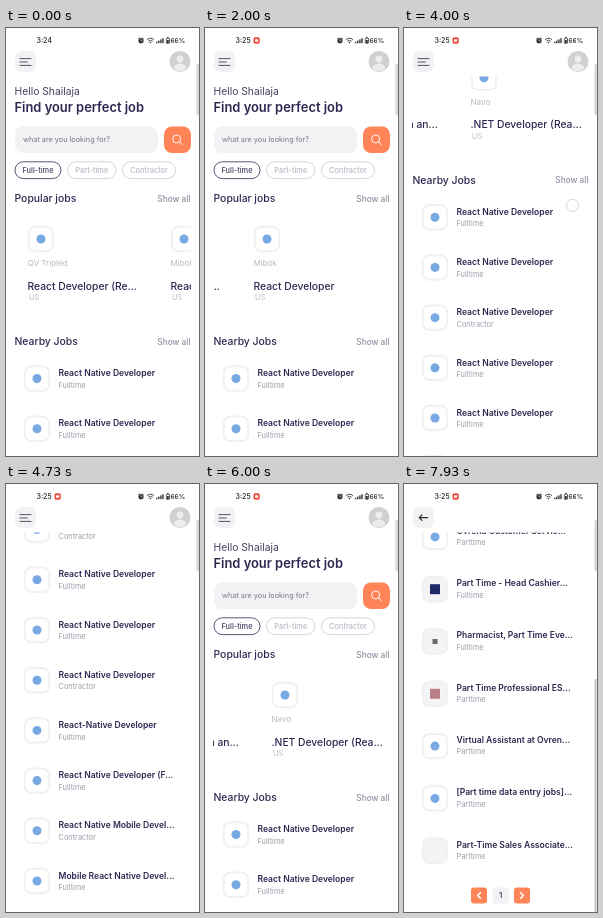
Recreate the animation shown at these times as an HTML page. Size 193 px wide and 428 px high, loop 8 s.

```html
<!DOCTYPE html>
<html lang="en">
<head>
<meta charset="utf-8">
<title>Job finder app</title>
<style>
  html, body { margin: 0; height: 100%; overflow: hidden; background: #fff; }
  svg { display: block; width: 100vw; height: 100vh; font-family: Inter, "Open Sans", sans-serif; }
</style>
</head>
<body>
<svg id="stage" viewBox="0 0 193 428">
  <clipPath id="body"><rect y="48.5" width="193" height="380"/></clipPath>
  <clipPath id="strip"><rect x="8" y="180" width="177" height="110"/></clipPath>
</svg>
<script>
const LOOP = 8000, ROW = 50.2, JOB_ROW = 52.3, CARD = 143, PAGE_END = 240;
const INK = '#312651', NAVY = '#444262', MUTED = '#9f9eac', PALE = '#bbb9c6',
      ORANGE = '#ff8558', PANEL = '#f2f2f5', BLUE = '#78a9e2';

const stage = document.getElementById('stage');

function el(parent, tag, attrs = {}) {
  const node = document.createElementNS('http://www.w3.org/2000/svg', tag);
  set(node, attrs);
  return parent.appendChild(node);
}
function set(node, attrs) {
  for (const key in attrs) node.setAttribute(key, attrs[key]);
}
const group = (parent, attrs) => el(parent, 'g', attrs);
const box = (parent, x, y, width, height, rx, fill, more) =>
  el(parent, 'rect', { x, y, width, height, rx, fill, ...more });
const disc = (parent, cx, cy, r, fill, more) => el(parent, 'circle', { cx, cy, r, fill, ...more });
const line = (parent, d, stroke, width = 1) =>
  el(parent, 'path', { d, fill: 'none', stroke, 'stroke-width': width, 'stroke-linecap': 'round', 'stroke-linejoin': 'round' });
function text(parent, x, y, str, size, weight = 400, fill = INK, more) {
  const node = el(parent, 'text', { x, y, 'font-size': size, 'font-weight': weight, fill, ...more });
  node.textContent = str;
  return node;
}
const move = (node, x, y) => node.setAttribute('transform', `translate(${x} ${y})`);
const show = (node, on) => node.setAttribute('visibility', on ? 'inherit' : 'hidden');

function frame(parent, cx, cy, fill = '#fff') {
  box(parent, cx - 12.2, cy - 12.2, 24.4, 24.4, 6.5, fill, { stroke: '#f1f1f4', 'stroke-width': 2 });
}
function jobRow(parent, y, title, kind) {
  text(parent, 52.5, y + 3.2, title, 8.55, 600);
  text(parent, 52.5, y + 14.7, kind, 7.4, 400, MUTED);
}

// Home screen
const homeView = group(stage, { 'clip-path': 'url(#body)' });
const home = group(homeView);
text(home, 8.5, 67.3, 'Hello Shailaja', 10.3, 400, NAVY);
text(home, 8.5, 84, 'Find your perfect job', 12.9, 600);
box(home, 9, 98.5, 143, 26.5, 8, PANEL);
text(home, 17, 114.3, 'what are you looking for?', 7.3, 400, '#77768a');
box(home, 158, 98.5, 27, 26.5, 8, ORANGE);
disc(home, 170.7, 111, 4, 'none', { stroke: '#fff', 'stroke-width': 0.9 });
line(home, 'M173.7 114l2.8 2.8', '#fff', 0.9);

const chips = [['Full-time', 9, 46], ['Part-time', 61.5, 48.5], ['Contractor', 116.5, 53]].map(([name, x, w]) => ({
  edge: box(home, x, 133.8, w, 16.8, 8.4, '#fff', { 'stroke-width': 0.9 }),
  label: text(home, x + w / 2, 144.9, name, 7.4, 500, PALE, { 'text-anchor': 'middle' })
}));

function heading(y, title) {
  text(home, 8.5, y, title, 10.4, 500);
  text(home, 184.5, y - 0.2, 'Show all', 8.3, 500, '#918fa0', { 'text-anchor': 'end' });
}
heading(174, 'Popular jobs');
heading(316.9, 'Nearby Jobs');

const strip = group(group(home, { 'clip-path': 'url(#strip)' }));
[
  ['QV Tripled', 'React Developer (Re...'],
  ['Mibok', 'React Developer'],
  ['Navo', 'React Developer (Re...'],
  ['Tilmar', 'Node React develop...'],
  ['Navo', 'Patient Education an...'],
  ['Navo', '.NET Developer (Rea...']
].forEach(([firm, title], i) => {
  const x = 22 + i * CARD, green = i === 3;
  frame(strip, x + 13, 211, green ? PANEL : '#fff');
  disc(strip, x + 13, 211, 4.5, green ? '#2c5a3c' : BLUE);
  text(strip, x - 0.5, 238, firm, 8.1, 400, PALE);
  text(strip, x - 0.5, 261.6, title, 10.3, 500);
  text(strip, x + 1, 272, 'US', 7.3, 400, PALE);
});

[
  ['React Native Developer', 0], ['React Native Developer', 0], ['React Native Developer', 1],
  ['React Native Developer', 0], ['React Native Developer', 0], ['React Native Developer', 1],
  ['React-Native Developer', 0], ['React Native Developer (F...', 0],
  ['React Native Mobile Devel...', 1], ['Mobile React Native Devel...', 0]
].forEach(([title, contract], i) => {
  const y = 345 + i * ROW;
  frame(home, 31, y + 5.5);
  disc(home, 31, y + 5.5, 4.5, BLUE);
  jobRow(home, y, title, contract ? 'Contractor' : 'Fulltime');
});

const homeBar = group(stage);
box(homeBar, 9, 23, 21, 21, 6, PANEL);
line(homeBar, 'M14 30.6h11M14 34h7.5M14 37.4h11', '#45434f', 0.9);
disc(homeBar, 174, 33.5, 10.5, '#d0d0d2');
disc(homeBar, 174, 31, 3.4, '#ededee');
el(homeBar, 'path', { d: 'M167.6 40.8a6.4 5.4 0 0 1 12.8 0a10 10 0 0 1-12.8 0z', fill: '#ededee' });

// Part-time results page
const page = group(stage);
box(page, 0, 0, 193, 428, 0, '#fff');
const results = group(group(page, { 'clip-path': 'url(#body)' }));
text(results, 8.5, 74, 'Part-time', 12.9, 600);
text(results, 8.5, 92, 'Job Opportunities', 8.2, 400, MUTED);
const list = group(results);
const logos = [
  ['Part Time Store Associate...', 'Parttime', BLUE],
  ['Part Time Front Desk Cler...', 'Parttime', BLUE],
  ['Part-Time Office Assistant', 'Parttime', BLUE],
  ['Ovrena Customer Servic...', 'Parttime', BLUE],
  ['Part Time - Head Cashier...', 'Fulltime', '#1d2b66'],
  ['Pharmacist, Part Time Eve...', 'Fulltime', '#6d6a68'],
  ['Part Time Professional ES...', 'Parttime', '#b98186'],
  ['Virtual Assistant at Ovren...', 'Parttime', BLUE],
  ['[Part time data entry jobs]...', 'Parttime', BLUE],
  ['Part-Time Sales Associate...', 'Parttime', null]
].map(([title, kind, color], i) => {
  const y = 129.6 + i * JOB_ROW, cy = y + 6.4, round = color === BLUE;
  frame(list, 31, cy, round ? '#fff' : '#f4f4f7');
  jobRow(list, y, title, kind);
  if (!color) return null;
  const half = i === 5 ? 2.5 : 5;
  return round ? disc(list, 31, cy, 4.5, color)
               : box(list, 31 - half, cy - half, 2 * half, 2 * half, 0, color);
});
const footY = 411.5 + PAGE_END;
[67, 110].forEach((x, i) => {
  box(list, x, footY - 8, 16, 16, 3, ORANGE);
  const s = i ? 1 : -1;
  line(list, `M${x + 8 - s * 1.4} ${footY - 2.8}l${s * 2.8} 2.8l${-s * 2.8} 2.8`, '#fff', 1.6);
});
box(list, 88.5, footY - 8, 16.5, 16, 2, PANEL);
text(list, 96.7, footY + 2.9, '1', 8, 500, INK, { 'text-anchor': 'middle' });
const spinner = el(results, 'path', {
  d: 'M96.5 113a9 9 0 1 1-9 9', fill: 'none', stroke: INK, 'stroke-width': 1.6
});
const thumb = box(page, 190.6, 48, 1.8, 233, 0.9, '#bcbcbc');
box(page, 9, 23, 21, 21, 6, PANEL);
line(page, 'M23.6 33.6h-8.4M18 30.8l-2.8 2.8l2.8 2.8', '#222', 1.1);

// Status bar and edge handle
const DARK = '#333';
const clock = text(stage, 30.5, 15, '', 7.1, 500, '#222');
const recorder = group(stage);
box(recorder, 48.4, 9.3, 6.4, 6.4, 1.6, '#e8503f');
box(recorder, 50, 11.2, 3.2, 2.6, 0.7, '#fff');
disc(stage, 135, 12.7, 2.6, DARK);
line(stage, 'M132.6 10.4l0.8-0.6M137.4 10.4l-0.8-0.6', DARK, 0.7);
line(stage, 'M135 11.5v1.4h1', '#fff', 0.5);
line(stage, 'M141.3 11.4a4.6 4.6 0 0 1 6.4 0M142.6 13a2.8 2.8 0 0 1 3.8 0', DARK, 0.9);
disc(stage, 144.5, 14.6, 0.8, DARK);
[0, 1, 2, 3].forEach(i => box(stage, 150 + i * 2.1, 13.8 - i * 1.2, 1.4, 1.4 + i * 1.2, 0, DARK));
box(stage, 160.3, 10.2, 3.2, 5.2, 0.7, 'none', { stroke: DARK, 'stroke-width': 0.8 });
box(stage, 161.2, 9, 1.4, 1, 0, DARK);
box(stage, 161, 12, 1.8, 3, 0, DARK);
text(stage, 164.5, 15, '66%', 6.5, 500, '#222');
box(stage, 190.3, 36, 5, 51, 1.6, '#d9d9dc');

const touch = disc(stage, 0, 0, 6, '#fff', { 'fill-opacity': 0.7, stroke: '#d2d2d6', 'stroke-width': 0.9 });

// Motion
const clamp = v => Math.max(0, Math.min(1, v));
const ease = {
  line: p => p,
  out: p => 1 - (1 - p) ** 3,
  both: p => p * p * (3 - 2 * p)
};
// keys: [time, value, easing towards this key]
function track(keys, t) {
  let value = keys[0][1];
  for (let i = 1; i < keys.length; i++) {
    const [from] = keys[i - 1], [to, next, kind = 'line'] = keys[i];
    if (t < from) break;
    value += (next - value) * ease[kind](clamp((t - from) / (to - from)));
  }
  return value;
}
const across = t => track([
  [1210, 0], [1420, 70], [2000, 116, 'out'], [2060, 116],
  [2260, 240], [2870, 417, 'out'], [2940, 417], [3120, 530], [3780, 670, 'out']
], t);
const down = t => track([
  [3840, 0], [4000, 159.6], [4270, 310, 'out'], [4420, 310], [4730, 405.3, 'out'],
  [4820, 405.3], [5300, 215, 'both'], [5740, 0, 'out']
], t);
const pageDown = t => track([[7550, 0], [7930, PAGE_END, 'both']], t);

// Finger strokes: start, end, x, y and what they drag
const strokes = [
  [1210, 1420, 140, 235, across, 'x'],
  [2060, 2260, 160, 235, across, 'x'],
  [2940, 3120, 150, 235, across, 'x'],
  [3840, 4040, 168.5, 338.6, down, 'y'],
  [4440, 4560, 168.5, 300, down, 'y'],
  [6060, 6200, 86, 142, () => 0, 'y']
];

function draw(t) {
  clock.textContent = t < 530 ? '3:24' : '3:25';
  show(recorder, t >= 530);

  move(strip, -across(t), 0);
  move(home, 0, -down(t));
  const active = t < 6130 ? 0 : 1;
  chips.forEach(({ edge, label }, i) => {
    edge.setAttribute('stroke', i === active ? NAVY : '#cfced6');
    label.setAttribute('fill', i === active ? NAVY : PALE);
  });

  const enter = ease.out(clamp((t - 6240) / 330));
  show(page, enter > 0);
  page.setAttribute('opacity', enter);
  move(page, 24 * (1 - enter), 0);
  show(list, t >= 6870);
  show(spinner, enter > 0 && t < 6870);
  spinner.setAttribute('transform', `rotate(${t * 0.36 % 360} 96.5 122)`);
  logos.forEach((logo, i) => logo && show(logo, t >= 6930 + i * 40));
  const s = pageDown(t);
  move(results, 0, -s);
  thumb.setAttribute('y', 48 + s * 147 / PAGE_END);
  show(thumb, t >= 7580);

  const stroke = strokes.find(([a, b]) => t >= a && t < b);
  show(touch, !!stroke);
  if (stroke) {
    const [a, , x, y, pull, axis] = stroke, d = pull(t) - pull(a);
    set(touch, { cx: axis === 'x' ? x - d : x, cy: axis === 'y' ? y - d : y });
  }
}

const start = performance.now();
function tick(now) {
  draw(Math.max(0, now - start) % LOOP);
  requestAnimationFrame(tick);
}
draw(0);
requestAnimationFrame(tick);
</script>
</body>
</html>
```
